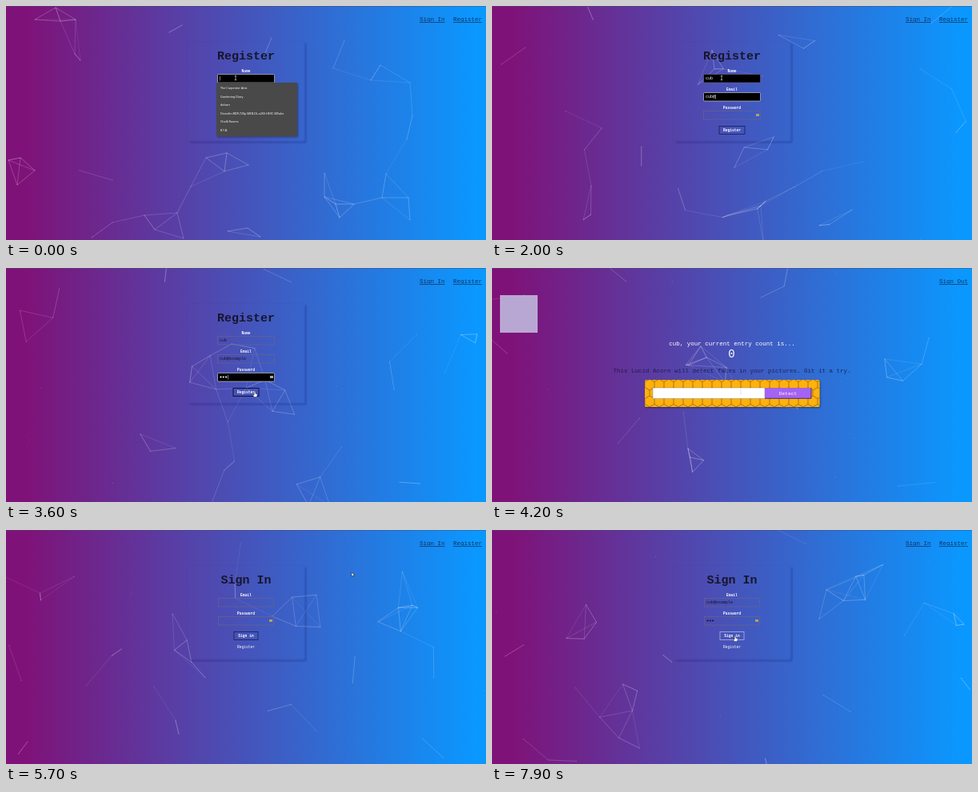
An HTML page with a canvas for the animation above (8 s loop, 600 px wide and 293 px high).

```html
<!DOCTYPE html>
<html lang="en">
<head>
<meta charset="utf-8">
<title>Sign-up demo</title>
<style>
html, body { margin: 0; width: 100%; height: 100%; overflow: hidden; }
body { background: linear-gradient(90deg, #7f1278 4%, #0a98ff 98%); }
canvas, svg { position: absolute; left: 0; top: 0; }
text { font: 7.5px "Courier New", "Liberation Mono", monospace; fill: #fff; white-space: pre; }
.mid { text-anchor: middle; }
.dark { fill: #10102e; fill-opacity: .75; }
.nav { text-decoration: underline; }
.title { font-size: 15px; font-weight: bold; fill: #16162c; }
.label { font-size: 4.6px; font-weight: bold; }
.link { font-size: 4.6px; }
.value { font-size: 5px; }
.item { font: 3.7px "Noto Sans", "Open Sans", sans-serif; }
.count { font-size: 14px; }
.detect { font-size: 6.2px; }
</style>
</head>
<body>
<canvas id="net" width="600" height="293"></canvas>
<svg id="ui" width="600" height="293" viewBox="0 0 600 293"></svg>
<script>
const W = 600, H = 293, LOOP = 8000, REACH = 52, EDGE = 8;
const ui = document.getElementById('ui');
const ctx = document.getElementById('net').getContext('2d');
const NAME = 'cub', EMAIL = 'cub@example';
const HINTS = ['The Carpenter Attic', 'Gardening Diary', 'dolvan',
  'Drovelin.BDR.720p.WEB-DL.x265.HEVC-MSubs', 'Chalk Rooms', 'R.T.B.'];
const C_HINTS = ['Chalk Rooms', 'Career', 'Coral Lumen'];

// Particle starting points, x then y
const START = [36,17, 62,2, 68,19, 87,17, 86,60, 93,68, 204,33, 220,24, 332,40, 321,66,
  423,43, 409,78, 456,93, 468,74, 505,96, 508,137, 501,167, 250,190, 276,184, 273,207,
  303,199, 231,226, 214,259, 222,291, 173,262, 186,280, 3,193, 18,190, 36,206, 14,224,
  92,206, 133,218, 133,271, 107,290, 398,209, 412,248, 398,239, 435,248, 417,265,
  475,210, 470,240, 503,240, 505,268, 277,282, 302,278, 318,289];

let seed = 11;
const rand = () => (seed = (seed * 16807) % 2147483647) / 2147483647;
const particles = [];
for (let i = 0; i < START.length; i += 2) {
  const angle = rand() * 2 * Math.PI, speed = 25 + rand() * 45;
  particles.push({ x: START[i], y: START[i + 1],
    vx: speed * Math.cos(angle), vy: speed * Math.sin(angle) });
}
function wrap(v, size) {
  const span = size + 2 * EDGE;
  return ((v + EDGE) % span + span) % span - EDGE;
}

function drawNet(t) {
  const s = t / 1000;
  const pts = particles.map(p => [wrap(p.x + p.vx * s, W), wrap(p.y + p.vy * s, H)]);
  ctx.clearRect(0, 0, W, H);
  ctx.lineWidth = 0.6;
  pts.forEach(([x, y], i) => {
    ctx.fillStyle = 'rgba(255,255,255,.3)';
    ctx.fillRect(x - 0.4, y - 0.4, 0.8, 0.8);
    for (let j = 0; j < i; j++) {
      const [u, v] = pts[j], d = Math.hypot(x - u, y - v);
      if (d > REACH) continue;
      ctx.strokeStyle = `rgba(255,255,255,${0.14 + 0.56 * (1 - d / REACH)})`;
      ctx.beginPath();
      ctx.moveTo(x, y);
      ctx.lineTo(u, v);
      ctx.stroke();
    }
  });
}

// Pointer path: time, x, y
const PATH = [[0, 287, 90], [3000, 287, 90], [3500, 311, 155], [4200, 311, 155],
  [4800, 357, 91], [5200, 575, 16], [5500, 575, 16], [5900, 289, 90],
  [7400, 289, 90], [7700, 304, 133], [LOOP, 304, 133]];

function pointerAt(t) {
  const i = PATH.findIndex(k => k[0] > t);
  const [t0, x0, y0] = PATH[i - 1], [t1, x1, y1] = PATH[i];
  const k = (t - t0) / (t1 - t0), e = k * k * (3 - 2 * k);
  return [x0 + (x1 - x0) * e, y0 + (y1 - y0) * e];
}

const text = (x, y, cls, s) => `<text x="${x}" y="${y}" class="${cls}">${s}</text>`;
const rect = (x, y, w, h, fill, extra = '') =>
  `<rect x="${x}" y="${y}" width="${w}" height="${h}" fill="${fill}" ${extra}/>`;
const inside = ([px, py], x, y, w, h) => px >= x && px <= x + w && py >= y && py <= y + h;
const typed = (s, t, start, step) =>
  s.slice(0, Math.max(0, Math.floor((t - start) / step) + 1));

const nav = (x, s) => text(x, 19, 'nav dark', s);
const guestNav = () => nav(517, 'Sign In') + nav(559, 'Register');

const card = h => rect(226.5, 44.5, 149, h, 'none',
  'rx="2" stroke="#000" stroke-opacity=".06" stroke-width=".5"') +
  `<path d="M230 ${44 + h}H374.5V47" fill="none" stroke="#10184c" stroke-opacity=".42" filter="url(#soft)"/>`;

function field(label, x, y, w, value, focus, mouse, secret) {
  const lit = focus || inside(mouse, x, y, w, 11);
  const ink = lit ? '#fff' : '#14142c';
  let out = text(300, y - 2.3, 'label mid', label) +
    rect(x + .5, y + .5, w - 1, 10.5, lit ? '#000' : 'none', focus
      ? 'rx="1" stroke="#ddd" stroke-width=".6"'
      : 'stroke="#6c6684" stroke-opacity=".8" stroke-width=".8"');
  if (secret) {
    for (let i = 0; i < value.length; i++)
      out += `<circle cx="${x + 4.5 + i * 3.3}" cy="${y + 5.5}" r="1.1" fill="${ink}"/>`;
    out += rect(x + w - 6, y + 4, 4, 3, focus ? '#aaa' : '#b5a25c');
  } else {
    out += `<text x="${x + 3}" y="${y + 7.2}" class="value" style="fill:${ink}">${value}</text>`;
  }
  if (focus) out += rect(x + 3.2 + value.length * (secret ? 3.3 : 3), y + 3, .5, 5.5, '#fff');
  return out;
}

function button(x, y, w, s, mouse, focus) {
  const hot = inside(mouse, x, y, w, 11);
  return rect(x + .5, y + .5, w - 1, 10, 'none',
    `stroke="${focus ? '#ccd' : '#11112a'}" stroke-width="${hot && !focus ? 1 : .65}"`) +
    text(300, y + 7, 'label mid', s);
}

function hintList(items) {
  return rect(263, 96, 101, items.length * 10.7 + 3, '#484848',
    'rx="1" filter="url(#drop)"') +
    items.map((s, i) => text(268, 104 + i * 10.6, 'item', s)).join('');
}

function registerPage(t, mouse) {
  return guestNav() + card(126.5) + text(300, 67, 'title mid', 'Register') +
    field('Name', 264, 85, 72, typed(NAME, t, 700, 200), t < 1300, mouse) +
    field('Email', 264, 108, 72, typed(EMAIL, t, 1500, 150), t >= 1300 && t < 3100, mouse) +
    field('Password', 264, 131, 72, typed('...', t, 3200, 100), t >= 3100, mouse, true) +
    button(283.5, 150, 33, 'Register', mouse) +
    (t < 700 ? hintList(HINTS) : t < 900 ? hintList(C_HINTS) : '');
}

function homePage() {
  return nav(559, 'Sign Out') + rect(10, 34, 47, 47, '#b9a7d3') +
    text(300, 97, 'mid', NAME + ', your current entry count is...') +
    text(299.5, 112, 'count mid', '0') +
    text(300, 131, 'mid dark', 'This Lucid Acorn will detect faces in your pictures. Git it a try.') +
    rect(191, 140, 218.5, 34, '#ffb10a', 'rx="2" filter="url(#drop)"') +
    rect(191, 140, 218.5, 34, 'url(#comb)', 'rx="2"') +
    rect(201, 150, 140, 13.5, '#fff', 'stroke="#888" stroke-width=".5"') +
    rect(341, 150, 58, 13.5, '#a463f2') +
    '<path d="M341 163.3H399V150" fill="none" stroke="#4d3268"/>' +
    text(370, 159, 'detect mid', 'Detect');
}

function signInPage(t, mouse) {
  return guestNav() + card(119.5) + text(300, 67, 'title mid', 'Sign In') +
    field('Email', 265, 85, 70, typed(EMAIL, t, 6000, 110), t >= 5900 && t < 7200, mouse) +
    field('Password', 265, 108, 70, typed('...', t, 7250, 100), t >= 7200 && t < 7800, mouse, true) +
    button(284.5, 127, 31, 'Sign in', mouse, t >= 7800) +
    text(300, 148, 'link mid', 'Register');
}

function cursor(t, mouse) {
  const home = t >= 4000 && t < 5400;
  const over = (...box) => inside(mouse, ...box);
  const hand = over(517, 12, 78, 9) || (home ? over(341, 150, 58, 13)
    : t < 4000 ? over(283, 150, 33, 11) : over(284, 127, 31, 11));
  const beam = home ? over(201, 150, 140, 13) : over(264, 85, 72, 11);
  const shape = hand
    ? '<path d="M-.8 0Q0-1 .8 0V2.2L3 3V5L2 6.5H-1L-2.5 4L-.8 4Z" fill="#fff" stroke="#222" stroke-width=".4"/>'
    : beam
    ? '<path d="M-1.2-2.6H1.2M0-2.6V2.6M-1.2 2.6H1.2" stroke="#ddd" stroke-width=".7"/>'
    : '<path d="M0 0V5L1.2 4L2 5.7L2.9 5.3L2.1 3.7H3.7Z" fill="#fff" stroke="#111" stroke-width=".5"/>';
  return `<g transform="translate(${mouse})">${shape}</g>`;
}

const DEFS = `<defs>
  <filter id="soft" x="-10%" y="-10%" width="120%" height="120%"><feGaussianBlur stdDeviation=".9"/></filter>
  <filter id="drop" x="-10%" y="-20%" width="120%" height="150%">
    <feDropShadow dx="1" dy="1" stdDeviation="1.2" flood-opacity=".4"/></filter>
  <pattern id="comb" width="12" height="21" x="191" y="139" patternUnits="userSpaceOnUse">
    <path d="M0 3.5L6 0L12 3.5V10.5L6 14L0 10.5ZM6 14V21" fill="none" stroke="#8a5a08" stroke-width=".7"/>
  </pattern></defs>`;

function draw(now) {
  const t = Math.floor(now % LOOP / 100) * 100;
  const mouse = pointerAt(t);
  const page = t < 4000 ? registerPage : t < 5400 ? homePage : signInPage;
  drawNet(t);
  ui.innerHTML = DEFS + rect(0, 0, W, 1, 'rgba(74,74,104,.45)') +
    page(t, mouse) + cursor(t, mouse);
}

let begin, last;
function tick(now) {
  begin ??= now;
  const step = Math.floor((now - begin) / 100);
  if (step !== last) draw((last = step) * 100);
  requestAnimationFrame(tick);
}
requestAnimationFrame(tick);
</script>
</body>
</html>
```
